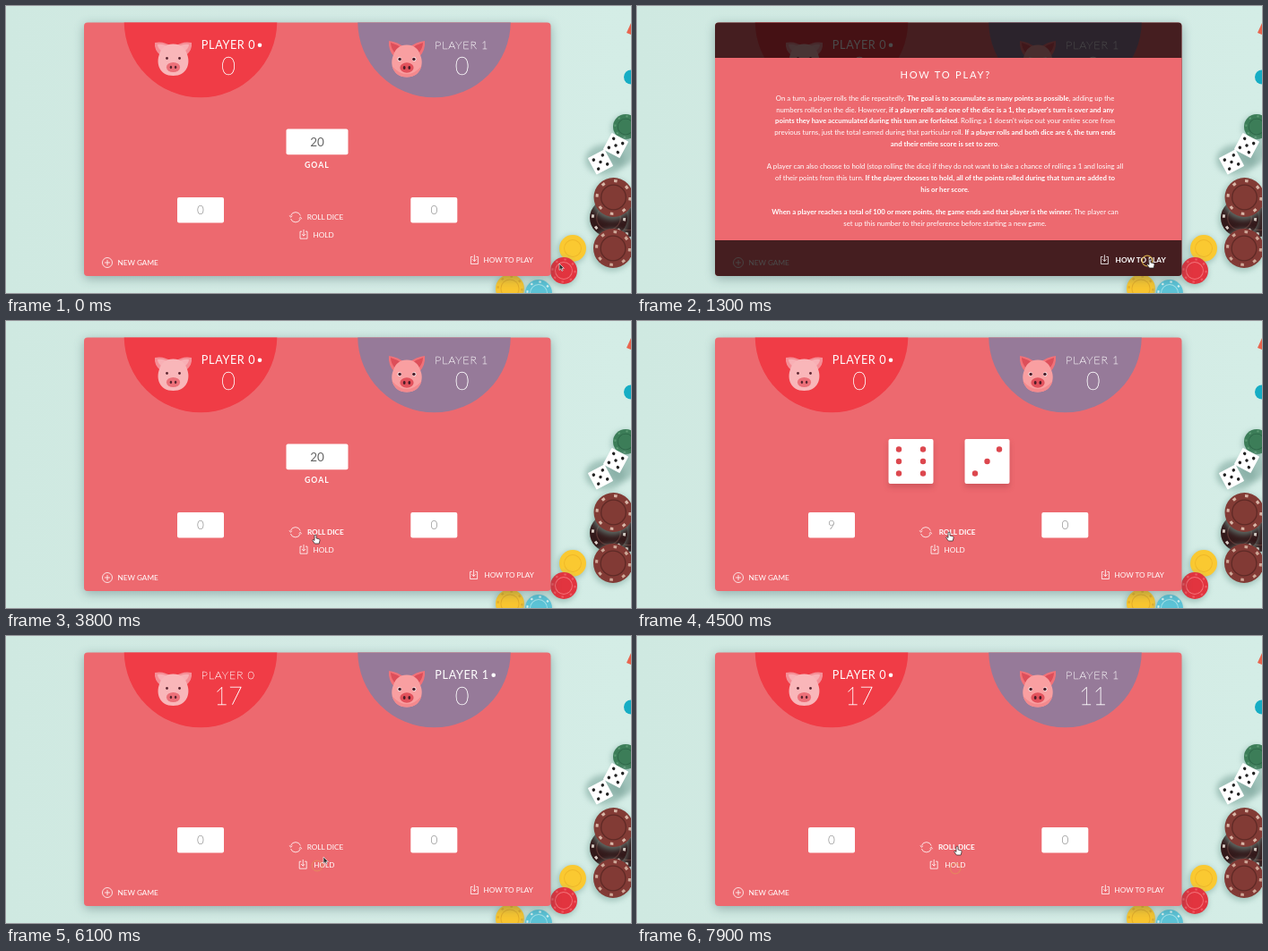
Write an HTML page that moves like this. It is 697 px wide and 321 px high and loops after 8 s.

```html
<!DOCTYPE html>
<html lang="en">
<head>
<meta charset="utf-8">
<title>Pig dice game</title>
<style>
html, body { margin: 0; width: 100%; height: 100%; overflow: hidden; background: #d2eae3; }
svg { display: block; width: 100vw; height: 100vh; font-family: Lato, sans-serif; }
.name { font-size: 12.6px; letter-spacing: .65px; fill: #fff; }
.name.off { font-weight: 100; letter-spacing: .8px; stroke: #fff; stroke-width: .3; }
.score { font-size: 27px; font-weight: 100; fill: #fff; stroke: #fff; stroke-width: .35; text-anchor: middle; }
.btn { fill: #fff; font-size: 8.2px; }
.icon { fill: none; stroke: #fff; stroke-width: .8; }
.field { font-size: 13.5px; fill: #888; font-weight: 300; text-anchor: middle; }
.rules { font-size: 7.8px; fill: #fff; text-anchor: middle; }
.rules .b { font-weight: 700; }
</style>
</head>
<body>
<svg id="stage" viewBox="0 0 697 321">
  <defs>
    <linearGradient id="mint"><stop offset="0" stop-color="#cfe9e1"/><stop offset=".5" stop-color="#d3eae4"/><stop offset="1" stop-color="#d4ede6"/></linearGradient>
    <clipPath id="cardClip"><rect x="87" y="18.5" width="520.5" height="283.5" rx="4"/></clipPath>
    <filter id="soft" x="-20%" y="-20%" width="140%" height="150%"><feGaussianBlur stdDeviation="6"/></filter>
    <filter id="soft2" x="-30%" y="-30%" width="160%" height="170%"><feGaussianBlur stdDeviation="3"/></filter>
  </defs>
  <rect width="697" height="321" fill="url(#mint)"/>
  <g id="table"></g>
  <rect x="87" y="21" width="521" height="284" rx="4" fill="#35545a" opacity=".4" filter="url(#soft)"/>
  <g clip-path="url(#cardClip)">
    <rect x="87" y="18" width="521" height="285" fill="#ed696f"/>
    <circle cx="217" cy="17" r="85.3" fill="#f03c46"/>
    <circle cx="477.5" cy="17" r="85.3" fill="#967a99"/>
    <g id="pigA">
      <path d="M172 55Q165 49 166 41Q176 39 184 45ZM201 55Q208 49 207 41Q197 39 189 45Z" fill="#f58e96"/>
      <path d="M174 51Q169 47 169 43Q176 42 181 46ZM199 51Q204 47 204 43Q197 42 192 46Z" fill="#f8b0b5"/>
      <path d="M186.5 42.5C195 42.5 200 47 202 54C206 64 202 78 186.5 78C171 78 167 64 171 54C173 47 178 42.5 186.5 42.5Z" fill="#f9b6b9"/>
      <ellipse cx="186.5" cy="68.5" rx="7.6" ry="5.6" fill="#ec7079"/>
      <g fill="#5a2530"><circle cx="179.5" cy="58.5" r="1.4"/><circle cx="193.5" cy="58.5" r="1.4"/>
      <ellipse cx="183.9" cy="68.5" rx="1.2" ry="1.8"/><ellipse cx="189.1" cy="68.5" rx="1.2" ry="1.8"/></g>
    </g>
    <g id="pigB">
      <path d="M433 57Q426 49 427 39Q437 40 445 47ZM461 57Q468 49 467 39Q457 40 449 47Z" fill="#f17178"/>
      <path d="M434 53Q429 47 429 41Q436 43 441 47ZM460 53Q465 47 465 41Q458 43 453 47Z" fill="#dd4f5a"/>
      <path d="M447 43.5C455 43.5 460 48 462 55C467 66 461 79.5 447 79.5C433 79.5 427 66 432 55C434 48 439 43.5 447 43.5Z" fill="#f99fa1"/>
      <path d="M430.5 67Q434 79.5 447 79.5Q460 79.5 463.5 67Q456 76 447 76Q438 76 430.5 67Z" fill="#f4898d"/>
      <ellipse cx="447" cy="69" rx="7.6" ry="5.8" fill="#e2525c"/>
      <g fill="#fff"><circle cx="438.8" cy="59.5" r="2.3"/><circle cx="455.2" cy="59.5" r="2.3"/></g>
      <g fill="#4a1c28"><circle cx="439.1" cy="59.5" r="1.8"/><circle cx="454.9" cy="59.5" r="1.8"/>
      <ellipse cx="444.2" cy="69" rx="1.4" ry="2"/><ellipse cx="449.8" cy="69" rx="1.4" ry="2"/></g>
    </g>
    <text id="name0" class="name" x="217.8" y="48">PLAYER 0</text>
    <text id="name1" class="name" x="478.3" y="48">PLAYER 1</text>
    <circle id="turn" cy="43.7" r="2.3" fill="#fff"/>
    <text id="score0" class="score" x="248" y="77.3"></text>
    <text id="score1" class="score" x="508.5" y="77.3"></text>
    <g id="goal">
      <rect x="312.5" y="137.5" width="69" height="28.8" rx="2" fill="#fff"/>
      <text class="field" x="347" y="157" style="fill:#666;font-weight:400">20</text>
      <text x="333" y="181" fill="#fff" font-size="8.7" font-weight="700" letter-spacing="1">GOAL</text>
    </g>
    <g id="dice"></g>
    <rect x="191" y="214" width="52" height="28.5" rx="2" fill="#fff"/>
    <rect x="451.3" y="214" width="52" height="28.5" rx="2" fill="#fff"/>
    <text id="cur0" class="field" x="217" y="233.3"></text>
    <text id="cur1" class="field" x="477.3" y="233.3"></text>
    <circle class="icon" cx="113" cy="287" r="5.5"/>
    <path class="icon" d="M110 287h6M113 284v6"/>
    <text class="btn" x="124.5" y="290.2">NEW GAME</text>
    <g id="roll"><g class="icon"><path d="M317.6 234.5A5.7 5.7 0 0 1 328.4 234.5M328.4 238A5.7 5.7 0 0 1 317.6 238"/><path d="M316.2 234.3l1.3 2 1.8-1.6M329.8 238.2l-1.3-2-1.8 1.6"/></g><text class="btn" x="335.7" y="239.4">ROLL DICE</text></g>
    <g id="hold"><g class="icon"><path d="M330 252.2h-2v8h8v-8h-2M332 250v7.2M329.8 255l2.2 2.2 2.2-2.2"/></g><text class="btn" x="342.4" y="259">HOLD</text></g>
    <g id="rules">
      <rect x="87" y="18" width="521" height="285" fill="#000" opacity=".71"/>
      <rect x="87" y="58" width="521" height="204" fill="#ed696f"/>
      <text x="293.5" y="81" fill="#fff" font-size="11.1" letter-spacing="1.8">HOW TO PLAY?</text>
    </g>
    <g id="how"><g class="icon"><path d="M520.4 280.5h-2v8h8v-8h-2M522.4 278.3v7.2M520.2 283.3l2.2 2.2 2.2-2.2"/></g><text class="btn" x="532.6" y="287.4">HOW TO PLAY</text></g>
  </g>
  <circle id="ring" r="5.8" fill="none" stroke="#d9b04a" stroke-width="1.2"/>
  <g id="cursor" stroke-linejoin="round">
    <path id="arrow" d="M0 0V7.4L1.8 5.9 2.9 8.4 4.1 7.9 3 5.4H5.4Z" fill="#333" stroke="#fff" stroke-width=".6"/>
    <path id="hand" d="M-1 .6Q0-.6 1 .6V4L4.2 4.8Q5.2 5.2 5 6.4L4.2 10H-.6L-3.2 6.6Q-3.2 5.2-2 5.6L-1 6.5Z" fill="#fff" stroke="#222" stroke-width=".7"/>
  </g>
</svg>
<script>
const $ = id => document.getElementById(id);
const LOOP = 8000, STEP = 100;
const OPEN = 1300, CLOSE = 3800;

// Table props around the card
const dot = (x, y, r, c) => `<circle cx="${x}" cy="${y}" r="${r}" fill="${c}"/>`;
const shade = (x, y, rx, ry) =>
  `<ellipse cx="${x}" cy="${y}" rx="${rx}" ry="${ry}" fill="#7fa79e" opacity=".6" filter="url(#soft2)"/>`;
function chip(x, y, r, c, edge, inner) {
  const dash = r * .84 * Math.PI * 2 / 16;
  return shade(x - 1, y + 2, r * 1.06, r * 1.06) + dot(x, y, r, c) +
    `<circle cx="${x}" cy="${y}" r="${r * .84}" fill="none" stroke="${edge}" stroke-width="${r * .14}" stroke-dasharray="${dash * .5} ${dash * 1.5}"/>` +
    dot(x, y, r * .66, inner) + dot(x, y, r * .6, c);
}
const PIPS = {
  3: [[1, -1], [0, 0], [-1, 1]],
  5: [[-1, -1], [1, -1], [0, 0], [-1, 1], [1, 1]],
  6: [[-1, -1], [-1, 0], [-1, 1], [1, -1], [1, 0], [1, 1]]
};
function die(x, y, size, n, color, turn = 0) {
  const h = size / 2, gap = size * .27;
  return `<g transform="translate(${x} ${y}) rotate(${turn})"><rect x="${-h}" y="${-h}" width="${size}" height="${size}" rx="${size * .04}" fill="#fff"/>` +
    PIPS[n].map(([a, b]) => dot(a * gap, b * gap, size * .064 + (size < 30 ? .4 : 0), color)).join('') + '</g>';
}
$('table').innerHTML =
  '<path d="M697 19L692 30 697 32Z" fill="#e9654e"/>' + dot(697, 79.5, 8, '#16adc4') +
  chip(691, 135, 14, '#3c7d58', '#5d9a74', '#2c6446') +
  shade(668, 172, 22, 17) + shade(686, 163, 16, 16) +
  die(680, 156, 21, 5, '#222', 28) + die(663, 174.5, 21, 5, '#222', -28) +
  chip(694, 238, 20, '#33191a', '#d9cbc4', '#5b3431') + chip(672, 237, 21, '#33191a', '#d9cbc4', '#5b3431') +
  chip(677.5, 214, 22, '#823b35', '#d8b5a6', '#5f2a26') + chip(677, 271, 22, '#823a35', '#cfa898', '#5f2a26') +
  chip(632, 271, 15, '#fac931', '#fac931', '#eeb728') + chip(622, 296, 15, '#e2343f', '#ee5a62', '#f3747a') +
  chip(562, 316, 16, '#f8c530', '#e5ad28', '#e5ad28') + chip(594, 321, 15, '#5cc3d6', '#d7f0f0', '#a5e2ea');

// Rules text, bold parts between asterisks
const RULES = [
  'On a turn, a player rolls the die repeatedly. *The goal is to accumulate as many points as possible*, adding up the',
  'numbers rolled on the die. However, *if a player rolls and one of the dice is a 1, the player\'s turn is over and any*',
  '*points they have accumulated during this turn are forfeited*. Rolling a 1 doesn\'t wipe out your entire score from',
  'previous turns, just the total earned during that particular roll. *If a player rolls and both dice are 6, the turn ends*',
  '*and their entire score is set to zero*.', '',
  'A player can also choose to hold (stop rolling the dice) if they do not want to take a chance of rolling a 1 and losing all',
  'of their points from this turn. *If the player chooses to hold, all of the points rolled during that turn are added to*',
  '*his or her score*.', '',
  '*When a player reaches a total of 100 or more points, the game ends and that player is the winner*. The player can',
  'set up this number to their preference before starting a new game.'
];
$('rules').innerHTML += RULES.map((line, i) =>
  `<text class="rules" x="343.5" y="${105.8 + i * 12.75}">` +
  line.split('*').map((s, k) => k % 2 ? `<tspan class="b">${s}</tspan>` : s).join('') + '</text>').join('');

// Cursor stops: time, x, y
const PATH = [
  [200, 617, 288], [800, 570, 281], [1100, 572, 283], [3700, 572, 283], [3800, 345, 239],
  [4500, 348, 236], [5400, 348, 236], [5800, 348, 257], [6000, 348, 257], [6100, 354, 247],
  [6400, 356, 237], [7000, 356, 237], [7400, 355, 260], [7800, 355, 260], [7900, 357, 235]
];
const HOVERS = {
  how: [[650, 3750]],
  roll: [[3750, 5550], [6250, 7150], [7850, 8100]],
  hold: [[5650, 6050], [7250, 7850]]
};
const CLICKS = [[1300, 569, 285], [4000, 346, 238], [5100, 348, 237], [6000, 347, 257], [6600, 356, 237], [7800, 355, 260]];

// Game states: time, player, scores, current points, dice (null keeps the table empty)
const GAME = [
  [0, 0, [0, 0], [0, 0], null],
  [4100, 0, [0, 0], [9, 0], [6, 3]],
  [5200, 0, [0, 0], [17, 0], [3, 5]],
  [6000, 1, [17, 0], [0, 0], null],
  [6700, 1, [17, 0], [0, 11], [6, 5]],
  [7800, 0, [17, 11], [0, 0], null]
];

const clamp = v => Math.max(0, Math.min(1, v));
const ease = v => v * v * (3 - 2 * v);

function place(t) {
  let a = PATH[0];
  for (const b of PATH) {
    if (t < b[0]) {
      const k = ease(clamp((t - a[0]) / (b[0] - a[0] || 1)));
      return [a[1] + (b[1] - a[1]) * k, a[2] + (b[2] - a[2]) * k];
    }
    a = b;
  }
  return [a[1], a[2]];
}

function hover(id, t) {
  let amount = 0, on = false;
  for (const [from, to] of HOVERS[id]) {
    on = on || (t >= from && t < to);
    amount = Math.max(amount, Math.min(clamp((t - from) / 250), clamp(1 - (t - to) / 250)));
  }
  const [icon, label] = $(id).children;
  icon.setAttribute('transform', `translate(${-amount} 0)`);
  label.setAttribute('transform', `translate(${amount} 0)`);
  label.style.fontWeight = on ? 700 : 400;
  return on;
}

const show = (id, on) => { $(id).style.display = on ? '' : 'none'; };

function draw(t) {
  const [since, player, scores, points, dice] = GAME.filter(s => s[0] <= t).pop();
  for (const i of [0, 1]) {
    $('score' + i).textContent = scores[i];
    $('cur' + i).textContent = points[i];
    $('name' + i).classList.toggle('off', i !== player);
  }
  $('turn').setAttribute('cx', player ? 543.7 : 283);
  show('goal', t < GAME[1][0]);
  show('rules', t >= OPEN && t < CLOSE);
  $('dice').innerHTML = dice ? dice.map((n, i) => {
    const x = 305.5 + i * 85;
    return `<rect x="${x - 25}" y="136" width="50" height="50" fill="#8d2930" opacity=".3" filter="url(#soft2)"/>` + die(x, 157, 50, n, '#dc474e');
  }).join('') : '';
  $('dice').style.opacity = clamp((t - since + STEP) / 200);

  const over = Object.keys(HOVERS).map(id => hover(id, t)).some(Boolean);
  show('hand', over);
  show('arrow', !over);
  $('cursor').setAttribute('transform', `translate(${place(t)})`);

  const click = CLICKS.find(c => t >= c[0] && t < c[0] + 200);
  show('ring', click);
  if (click) {
    $('ring').setAttribute('transform', `translate(${click[1]} ${click[2]})`);
    $('ring').style.opacity = .9 - (t - click[0]) / 200;
  }
}

function tick() {
  draw(Math.floor(performance.now() % LOOP / STEP) * STEP);
  requestAnimationFrame(tick);
}
tick();
</script>
</body>
</html>
```
